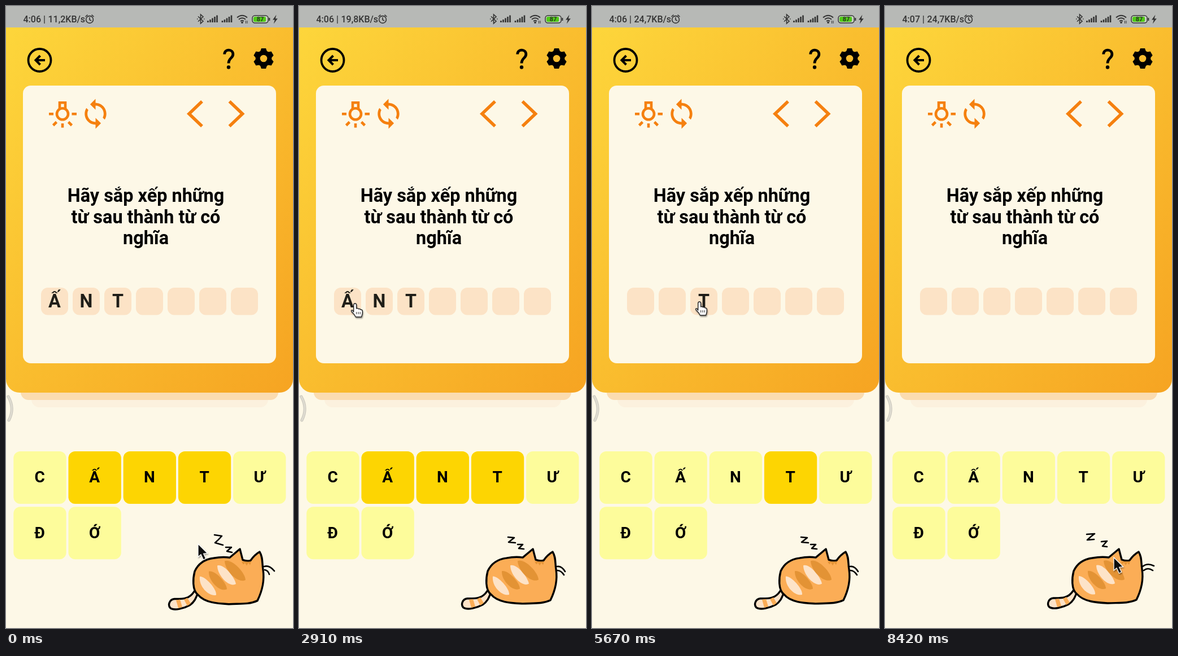
Animation, 508 px wide and 1102 px high, one loop 8.45 s. Source, as an HTML page:

```html
<!DOCTYPE html>
<html lang="vi">
<head>
<meta charset="utf-8">
<title>Xếp chữ</title>
<style>
html, body { margin: 0; width: 100%; height: 100%; overflow: hidden; background: #fdf8e7; }
svg { display: block; width: 100%; height: 100%; }
text { font-family: Roboto, sans-serif; font-weight: 700; }
.mid { text-anchor: middle; }
.status { font-size: 16px; font-weight: 500; fill: #333; }
.ask { font-size: 32.4px; }
.slot { font-size: 32.4px; fill: #1f1e18; }
.key { font-size: 28px; }
.line { fill: none; stroke: #000; stroke-linecap: round; stroke-linejoin: round; }
.orange { fill: none; stroke: #f5800f; }

.pick0, .pick1, .pick2, .early, .middle, .late, .before, .after, .arrow, .hand {
  animation: 8450ms step-end infinite;
}
.pick0 { animation-name: pick0; }
.pick1 { animation-name: pick1; }
.pick2 { animation-name: pick2; }
.early { animation-name: early; }
.middle { animation-name: middle; }
.late { animation-name: late; }
.before { animation-name: before; }
.after { animation-name: after; }
.arrow { animation-name: arrow; }
.hand { animation-name: hand; }
#cursor { animation: travel 8450ms ease-in-out infinite; }

@keyframes pick0 { 0% { opacity: 1 } 39%, 100% { opacity: 0 } }
@keyframes pick1 { 0% { opacity: 1 } 52.7%, 100% { opacity: 0 } }
@keyframes pick2 { 0% { opacity: 1 } 72.2%, 100% { opacity: 0 } }
@keyframes early { 0% { opacity: 1 } 7.5%, 100% { opacity: 0 } }
@keyframes middle { 0% { opacity: 0 } 7.5% { opacity: 1 } 54.5%, 100% { opacity: 0 } }
@keyframes late { 0% { opacity: 0 } 54.5%, 100% { opacity: 1 } }
@keyframes before { 0% { opacity: 1 } 93.5%, 100% { opacity: 0 } }
@keyframes after { 0% { opacity: 0 } 93.5%, 100% { opacity: 1 } }
@keyframes arrow { 0% { opacity: 1 } 25.3% { opacity: 0 } 75.2%, 100% { opacity: 1 } }
@keyframes hand { 0% { opacity: 0 } 25.3% { opacity: 1 } 75.2%, 100% { opacity: 0 } }
@keyframes travel {
  0%, 6.2% { transform: translate(340px, 953px) }
  16.5%, 18.2% { transform: translate(150px, 585px) }
  29%, 40% { transform: translate(99px, 528px) }
  49%, 56% { transform: translate(147px, 520px) }
  64%, 73.2% { transform: translate(190px, 525px) }
  85.5%, 88% { transform: translate(431px, 955px) }
  98%, 100% { transform: translate(405px, 977px) }
}
</style>
</head>
<body>
<svg viewBox="0 0 508 1102" preserveAspectRatio="none">
  <defs>
    <linearGradient id="sun" x1="0" y1="0" x2="1" y2="1">
      <stop offset="0" stop-color="#fdd63b"/>
      <stop offset="1" stop-color="#f6a422"/>
    </linearGradient>
    <filter id="soft" x="-50%" y="-50%" width="200%" height="200%">
      <feDropShadow dx="1" dy="2" stdDeviation="1.3" flood-opacity=".4"/>
    </filter>
    <g id="bars">
      <path d="M1.5 29V26M5.5 29V24M9.5 29V21.5M13.5 29V19M17.5 29V16.5" stroke="#333" stroke-width="2.6" fill="none"/>
    </g>
    <path id="tooth" d="M-6.5 -11L-4 -18H4L6.5 -11Z"/>
  </defs>

  <rect width="508" height="1102" fill="#fdf8e7"/>

  <!-- panel stack -->
  <rect x="45" y="660" width="419" height="51" rx="14" fill="#fcf1de"/>
  <rect x="26" y="650" width="456" height="48" rx="14" fill="#fbdcb0"/>
  <path d="M0 38H508V661A24 24 0 0 1 484 685H24A24 24 0 0 1 0 661Z" fill="url(#sun)"/>
  <rect x="30" y="141" width="448" height="492" rx="14" fill="#fdf8e7"/>
  <path class="line" d="M4 692Q16 713 5 734" style="stroke:#c9c6bc;stroke-width:5"/>
  <path class="line" d="M4 692Q16 713 5 734" style="stroke:#dfdcd1;stroke-width:3"/>

  <!-- status bar -->
  <rect width="508" height="38" fill="#b7b9b6"/>
  <text class="status before" x="30.5" y="29">4:06</text>
  <text class="status after" x="30.5" y="29">4:07</text>
  <text class="status" x="66" y="29">|</text>
  <text class="status early" x="74.5" y="29">11,2KB/s</text>
  <text class="status middle" x="74.5" y="29">19,8KB/s</text>
  <text class="status late" x="74.5" y="29">24,7KB/s</text>
  <g fill="none" stroke="#333" stroke-width="1.6">
    <circle cx="148" cy="24" r="6.4"/>
    <path d="M148 20V24.5L151 26M140.5 19L144.5 15.7M155.5 19L151.5 15.7"/>
    <path d="M340 18.5L349 27L344.5 31V15L349 19L340 27.5M338 23H339.5M350 23H351.5"/>
  </g>
  <use href="#bars" x="356"/>
  <use href="#bars" x="381.5"/>
  <g fill="none" stroke="#333" stroke-width="2">
    <path d="M409 20.5Q418 13 427 20.5M412 23.8Q418 18.8 424 23.8M415 27Q418 24.5 421 27"/>
    <path d="M424.5 26V31M427 26V31" stroke-width="1"/>
  </g>
  <circle cx="418" cy="29.3" r="1.8" fill="#333"/>
  <rect x="436" y="17" width="28" height="13" rx="4.5" fill="#c8cdc4" stroke="#333" stroke-width="1.5"/>
  <rect x="438" y="19" width="22" height="9" rx="2.5" fill="#4fc916"/>
  <path d="M466.3 21V26" stroke="#333" stroke-width="2"/>
  <text class="mid" x="450" y="27.3" font-size="11" fill="#222" style="font-weight:500">87</text>
  <path d="M478.5 15.5L472 24.5H475.7L473.8 31.5L480.8 22.3H476.8Z" fill="#333"/>

  <!-- toolbar -->
  <circle cx="59.5" cy="96" r="20" fill="none" stroke="#000" stroke-width="3.8"/>
  <path d="M69 96H53M60.5 88L52.5 96L60.5 104" fill="none" stroke="#000" stroke-width="4"/>
  <path class="line" d="M386.7 85.5C387 75.5 401.8 76 401.8 85.5C401.8 92.5 394 92 394 101.5" style="stroke-width:4.8;stroke-linecap:butt"/>
  <circle cx="394" cy="108.5" r="3.2"/>
  <g id="gear" transform="translate(456 93)"><circle r="10.3" fill="none" stroke="#000" stroke-width="8"/></g>

  <!-- card controls -->
  <g class="orange" stroke-width="4.6">
    <path d="M95 182V171.3H105V182"/>
    <circle cx="100" cy="191.3" r="10"/>
    <path d="M76 191.3H84M116.5 191.3H125M100 208V215.5M83.5 211.5L89.5 205.5M116.5 211.5L110.5 205.5"/>
  </g>
  <path transform="translate(129.7 162.2) scale(2.4)" fill="#f5800f" d="M12 4V1L8 5l4 4V6c3.31 0 6 2.69 6 6 0 1.01-.25 1.97-.7 2.8l1.46 1.46C19.54 15.03 20 13.57 20 12c0-4.42-3.58-8-8-8zm0 14c-3.31 0-6-2.69-6-6 0-1.01.25-1.97.7-2.8L5.24 7.74C4.46 8.97 4 10.43 4 12c0 4.42 3.58 8 8 8v3l4-4-4-4v3z"/>
  <path class="orange" stroke-width="5.6" d="M347 169L324 191L347 213M395.5 169L418.5 191L395.5 213"/>

  <g class="ask mid">
    <text x="247.5" y="347">Hãy sắp xếp những</text>
    <text x="247.5" y="384.5">từ sau thành từ có</text>
    <text x="247.5" y="422">nghĩa</text>
  </g>
  <g id="slots"></g>
  <g id="keys"></g>

  <!-- cat -->
  <g id="cat">
    <path class="line" style="fill:#fde3c8;stroke-width:3.4" d="M333 1036C324 1050 312 1049 298 1049C289 1050 286 1060 291 1065C298 1070 316 1065 325 1060C333 1055 336 1048 339 1040"/>
    <path d="M301 1051L308 1050L312 1063L305 1065ZM315 1050L321 1047L327 1057L321 1061Z" fill="#fbad56"/>
    <path class="line" style="fill:#fbad56;stroke-width:3.4" d="M396 977L414 962L419 981Q428 984 433 982Q440 972 449 967C455 977 453 985 455 998C458 1018 453 1036 445 1052C430 1059 413 1057 395 1058C376 1057 352 1056 340 1042C329 1034 331 1012 334 1001C340 988 352 980 367 978Q383 975 396 977Z"/>
    <g fill="#fde3c8">
      <path d="M343 1010C352 1009 373 1031 372 1042C362 1046 341 1030 343 1010Z"/>
      <path d="M374 991C386 987 405 1012 407 1023C395 1030 374 1008 374 991Z"/>
    </g>
    <g fill="#e39335">
      <path d="M359 1001C370 998 391 1021 391 1032C379 1038 358 1018 359 1001Z"/>
      <path d="M387 983C399 978 423 1002 424 1016C411 1023 388 1001 387 983Z"/>
      <path d="M417 984H434L432 990L429 986L426 991L423 986L420 989Z"/>
    </g>
  </g>
  <g id="poses" class="line" stroke-width="2.6">
    <path d="M369 937L382 939Q376 946 370 951L384 955M389 959L399 959L391 966L400 968M457 993Q466 990 475 1001M458 999Q464 1000 466 1007"/>
    <path d="M357 936L371 935Q364 940 358 946L370 945M383 949L393 948L385 957L393 958M456 993Q465 986 476 992M458 1000Q465 994 474 1000"/>
    <path d="M370 941L381 942Q376 946 371 950L383 951M387 954L396 954L389 961L398 962M457 993Q465 992 471 1002M457 1000Q464 1000 469 1008"/>
  </g>

  <g id="cursor" filter="url(#soft)">
    <path class="arrow" d="M0 0V23L5 18.8L9.3 28L13.6 26L9.6 17.2L16.5 16.5Z" fill="#111" stroke="#fff" stroke-width="1.2"/>
    <g class="hand" fill="#fff" stroke="#222" stroke-width="1.4" stroke-linejoin="round">
      <path d="M-2.3 14V1.3Q-2 -1 .2 -1T2.6 1.3V8Q5 6.5 6.5 8.8Q9 7.8 10 10Q13 9.5 13.3 12.5V16Q13 19 11.5 23H1.5Q-1 18 -6 13.5Q-7.5 10.5 -4.5 11Z"/>
      <path d="M2.7 14V18M6 14V18M9.2 14V18" stroke-width="1"/>
    </g>
  </g>
</svg>
<script>
const byId = id => document.getElementById(id);
const add = (id, markup) => byId(id).insertAdjacentHTML('beforeend', markup);
const picked = ['Ấ', 'N', 'T'];

for (let i = 0; i < 6; i++) add('gear', `<use href="#tooth" transform="rotate(${i * 60})"/>`);

for (let i = 0; i < 7; i++) {
  const x = 62 + i * 56;
  add('slots', `<rect x="${x}" y="499" width="48" height="48.5" rx="12" fill="#fce3c6"/>`);
  if (picked[i]) add('slots', `<text class="slot mid pick${i}" x="${x + 24}" y="534">${picked[i]}</text>`);
}

[...'CẤNTƯĐỚ'].forEach((letter, i) => {
  const x = 13.3 + (i % 5) * 97.2;
  const y = 789 + Math.floor(i / 5) * 98.3;
  const rect = attrs => `<rect x="${x}" y="${y}" width="93.3" height="93" rx="12" ${attrs}/>`;
  const order = picked.indexOf(letter);
  add('keys', rect('fill="#fdfc9b"'));
  if (order >= 0) add('keys', rect(`fill="#fdd502" class="pick${order}"`));
  add('keys', `<text class="key mid" x="${x + 46.3}" y="${y + 55.3}">${letter}</text>`);
});

const LOOP = 8450, BREATH = 1190;
const poses = [...byId('poses').children];
const stretch = [1.018, 1, 1.009];

function poseAt(t) {
  if (t < 520) return 0;
  const phase = t / BREATH % 1;
  if (phase < .06 || phase >= .77) return 0;
  return phase < .41 ? 1 : 2;
}

function draw() {
  const pose = poseAt(performance.now() % LOOP);
  poses.forEach((p, i) => p.style.visibility = i === pose ? 'visible' : 'hidden');
  byId('cat').setAttribute('transform', `translate(0 963) scale(1 ${stretch[pose]}) translate(0 -963)`);
  requestAnimationFrame(draw);
}
draw();
</script>
</body>
</html>
```
